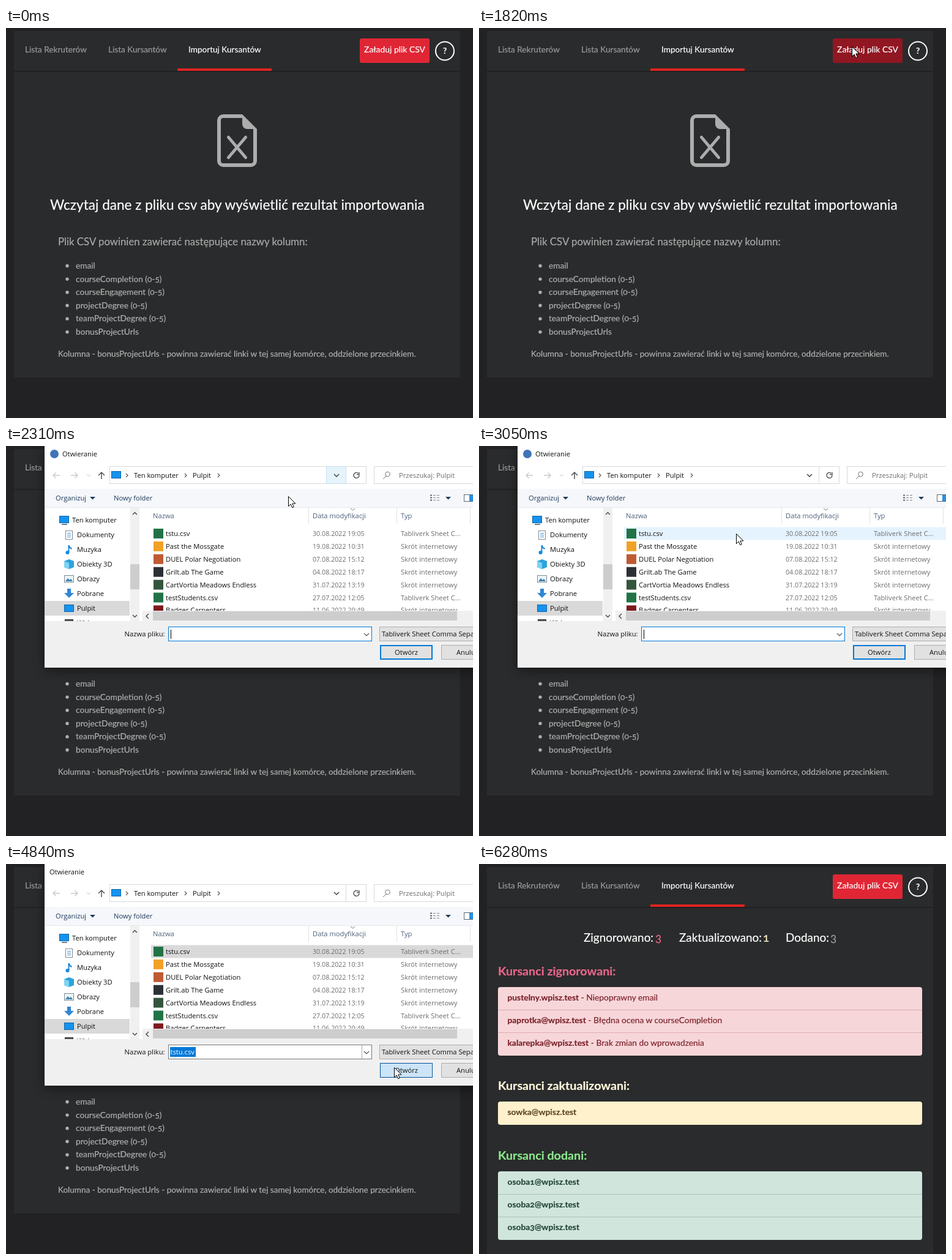
Recreate the animation shown at these times as an HTML page. Size 763 px wide and 637 px high, loop 7.7 s.

```html
<!DOCTYPE html>
<html lang="pl">
<head>
<meta charset="utf-8">
<title>Import kursantów</title>
<style>
html, body { margin: 0; width: 100%; height: 100%; overflow: hidden; background: #222224; }
#stage { display: block; width: 763px; height: 637px; }
text { white-space: pre; }
.web { font-family: Lato, sans-serif; font-variant-numeric: oldstyle-nums; }
.web text { stroke-width: .2px; }
.win { font-family: "Open Sans", "Noto Sans", sans-serif; }
.win text { stroke: none; }
.shadow { filter: drop-shadow(0 4px 9px #0007); }
</style>
</head>
<body>
<svg id="stage" viewBox="0 0 763 637"></svg>
<script>
const LOOP = 7700;
const stage = document.getElementById('stage');

const clamp = v => Math.max(0, Math.min(1, v));
const ramp = (t, a, b) => clamp((t - a) / (b - a));
const mix = (a, b, p) => `rgb(${a.map((v, i) => Math.round(v + (b[i] - v) * p))})`;
const text = (x, y, s, size, fill, more = '') =>
  `<text x="${x}" y="${y}" font-size="${size}" fill="${fill}" stroke="${fill}" ${more}>${s}</text>`;
const rect = (x, y, w, h, fill, more = '') =>
  `<rect x="${x}" y="${y}" width="${w}" height="${h}" fill="${fill}" ${more}/>`;
const line = (d, stroke, width = 1, more = '') =>
  `<path d="${d}" fill="none" stroke="${stroke}" stroke-width="${width}" ${more}/>`;
const shape = (d, fill) => `<path d="${d}" fill="${fill}"/>`;
const box = (x, y, w, h, fill, stroke) =>
  rect(x + .5, y + .5, w - 1, h - 1, fill, `stroke="${stroke}"`);

// Pointer stops: time, x, y
const path = [
  [120, 722, 640], [870, 618, 43], [1150, 607, 33], [1400, 607, 33], [1800, 609, 30],
  [1950, 609, 30], [2310, 461, 82], [2930, 420, 143], [3490, 420, 143], [3840, 529, 215],
  [4240, 634, 332], [5550, 634, 332], [5840, 643, 366], [6280, 695, 640]
];

function pointer(t) {
  const i = path.findIndex(k => k[0] > t);
  if (i < 1) return path[i < 0 ? path.length - 1 : 0].slice(1);
  const [a, b] = [path[i - 1], path[i]];
  const p = ramp(t, a[0], b[0]), e = p * p * (3 - 2 * p);
  return [a[1] + (b[1] - a[1]) * e, a[2] + (b[2] - a[2]) * e];
}

/* ---- web page ---- */

function header(t) {
  const hover = ramp(t, 800, 950) * (1 - ramp(t, 5180, 5400));
  const red = mix([224, 38, 53], [145, 23, 34], hover);
  return rect(13, 70, 729, 2, '#202122') +
    text(31, 40, 'Lista Rekruterów', 13.6, '#9b9b9d') +
    text(167, 40, 'Lista Kursantów', 13.6, '#9b9b9d') +
    text(298, 40, 'Importuj Kursantów', 13.6, '#fff') +
    rect(280, 66, 154, 4, '#dc2420') +
    rect(578, 17, 114, 40, red, 'rx="3"') +
    text(635, 40, 'Załaduj plik CSV', 13.9, '#fff', 'text-anchor="middle"') +
    '<circle cx="717" cy="37.5" r="15" fill="none" stroke="#fff" stroke-width="2"/>' +
    text(717, 42, '?', 13.5, '#fff', 'text-anchor="middle" font-weight="bold"');
}

const columns = ['email', 'courseCompletion (0-5)', 'courseEngagement (0-5)',
  'projectDegree (0-5)', 'teamProjectDegree (0-5)', 'bonusProjectUrls'];

const upload =
  line('M386 144H355a7 7 0 0 0-7 7V217a7 7 0 0 0 7 7H400a7 7 0 0 0 7-7V165', '#adadad', 6) +
  shape('M386 141L410 165H394a8 8 0 0 1-8-8z', '#adadad') +
  line('M363.5 178.5L391.5 211.5M391.5 178.5L363.5 211.5', '#adadad', 5, 'stroke-linecap="round"') +
  text(72, 297, 'Wczytaj dane z pliku csv aby wyświetlić rezultat importowania', 22.55, '#fff') +
  text(85, 355, 'Plik CSV powinien zawierać następujące nazwy kolumn:', 16.8, '#a9a9a9') +
  columns.map((c, i) => `<circle cx="100" cy="${388.5 + i * 21.6}" r="2.7" fill="#b0b0b0"/>` +
    text(114, 393 + i * 21.6, c, 13.7, '#b0b0b0')).join('') +
  text(85, 537, 'Kolumna - bonusProjectUrls - powinna zawierać linki w tej samej komórce, ' +
    'oddzielone przecinkiem.', 13.53, '#b0b0b0');

const spinner = t =>
  `<circle cx="377" cy="87" r="12.8" fill="none" stroke="#dc2f36" stroke-width="3.6"
    pathLength="8" stroke-dasharray="6 2" transform="rotate(${45 + (t - 5090) * .48} 377 87)"/>`;

function section(y, title, titleFill, fill, ink, rows) {
  const h = rows.length * 37 + 1;
  return text(31, y - 19, title, 19.7, titleFill, 'font-weight="bold"') +
    rect(31, y, 693, h, fill, 'rx="4"') +
    rows.map(([mail, note], i) =>
      (i ? rect(31, y + i * 37, 693, 1, ink, 'opacity=".22"') : '') +
      text(46.5, y + 22 + i * 37,
        `<tspan font-weight="bold">${mail}</tspan>${note ? ' - ' + note : ''}`, 13.8, ink)
    ).join('');
}

const results =
  [[171, 'Zignorowano:', 288, 3, '#e9668c'], [327, 'Zaktualizowano:', 464, 1, '#fff3cd'],
    [501, 'Dodano:', 574, 3, '#9b9b9d']].map(([x, label, nx, n, fill]) =>
    text(x, 127, label, 18.9, '#fff') + text(nx, 127, n, 18.9, fill)).join('') +
  section(201, 'Kursanci zignorowani:', '#e9668c', '#f7d6d9', '#7c232c', [
    ['pustelny.wpisz.test', 'Niepoprawny email'],
    ['paprotka@wpisz.test', 'Błędna ocena w courseCompletion'],
    ['kalarepka@wpisz.test', 'Brak zmian do wprowadzenia']]) +
  section(388, 'Kursanci zaktualizowani:', '#fff8dc', '#fff1cc', '#5f4727', [['sowka@wpisz.test']]) +
  section(502, 'Kursanci dodani:', '#8ae98a', '#d0e6dc', '#24463a',
    [1, 2, 3].map(n => [`osoba${n}@wpisz.test`]));

function page(t) {
  const [bottom, content] = t < 5040 ? [571, upload] :
    t < 5560 ? [101, spinner(t)] : [637, results];
  return `<g class="web">${rect(13, 5, 729, bottom - 5, '#2a2b2c')}${header(t)}${content}</g>`;
}

/* ---- file dialog ---- */

const SIZE = 11.2;
const label = (x, y, s, fill = '#111', more) => text(x, y, s, SIZE, fill, more);
const monitor = (x, y) => box(x, y, 16, 12, '#1593ee', '#0b64ad');

const sheet = 'Tabliverk Sheet C...', link = 'Skrót internetowy';
const files = [
  ['tstu.csv', '30.08.2022 19:05', sheet, '#217346'],
  ['Past the Mossgate', '19.08.2022 10:31', link, '#f2a127'],
  ['DUEL Polar Negotiation', '07.08.2022 15:12', link, '#bf5a34'],
  ['Grilt.ab The Game', '04.08.2022 18:17', link, '#2c3036'],
  ['CartVortia Meadows Endless', '31.07.2022 13:19', link, '#34553d'],
  ['testStudents.csv', '27.07.2022 12:05', sheet, '#217346'],
  ['Badger Carpenters', '11.06.2022 20:49', link, '#7d1a1d']
];

const treeIcons = [
  monitor(87, 114) + rect(91, 127, 9, 2, '#69808f'),
  box(97, 138, 12, 15, '#fff', '#7c8a94') +
    line('M100 142.5h6M100 145.5h6M100 148.5h6', '#3b8fd0'),
  line('M102.5 174V162q1 4 5 6', '#1588e0', 2) + '<circle cx="100.5" cy="174" r="3" fill="#1588e0"/>',
  shape('M95 188l8-3 8 3v10l-8 3-8-3z', '#2ea3dc') + shape('M95 188l8 3v10l-8-3z', '#7fd3f2'),
  box(95, 211, 16, 12, '#eef5fa', '#7c8a94') + shape('M97 221l4-5 3 3 2-2 3 4z', '#3a7fae'),
  shape('M100 233h6v7h5l-8 8-8-8h5z', '#2f86d6'),
  monitor(95, 259),
  box(96, 283, 14, 12, '#555', '#333')
];
const treeNames = ['Ten komputer', 'Dokumenty', 'Muzyka', 'Obiekty 3D', 'Obrazy', 'Pobrane',
  'Pulpit', 'Wideo'];
const tree = `<svg width="203" height="286">${rect(63, 253, 139, 24, '#d9d9d9')}${
  treeNames.map((s, i) => treeIcons[i] + label(i ? 116 : 108, 125 + i * 24, s)).join('')}</svg>` +
  rect(203, 101, 15, 185, '#f0f0f0') + rect(203, 193, 15, 41, '#cdcdcd') +
  line('M207 112l3.5-3.5 3.5 3.5M207 276l3.5 3.5 3.5-3.5', '#505050', 1.5);

const frame =
  rect(63, 0, 760, 362, '#fff', 'class="shadow"') +
  line('M88 48H77M81.5 43.5L77 48l4.5 4.5M106 48h11M112.5 43.5l4.5 4.5-4.5 4.5', '#c9c9c9', 1.4) +
  line('M132 46.5l3 3 3-3', '#c4c4c4') +
  line('M156 54V43M151 48l5-5 5 5', '#555', 1.5) +
  box(169, 33, 420, 29, '#fff', '#d9d9d9') + line('M555.5 33v29', '#d9d9d9') +
  monitor(172, 41) + line('M196 45l3 3-3 3M292 45l3 3-3 3M346 45l3 3-3 3', '#555', 1.2) +
  label(209, 52, 'Ten komputer') + label(305, 52, 'Pulpit') +
  line('M575.5 44.5a4.5 4.5 0 1 0 1.5 3M577 43v3.5h-4', '#555', 1.4) +
  box(601, 33, 230, 29, '#fff', '#d9d9d9') +
  '<circle cx="623.5" cy="46" r="3.8" fill="none" stroke="#777"/>' + line('M621 49l-5 5', '#777') +
  label(642, 52, 'Przeszukaj: Pulpit', '#6d6d6d') +
  rect(63, 70, 760, 30, '#f5f7fa') + rect(63, 100, 760, 1, '#e5e8ec') +
  label(81, 89, 'Organizuj', '#1e395b') + shape('M137 83h9l-4.5 4.5z', '#1e395b') +
  label(176, 89, 'Nowy folder', '#1e395b') +
  line('M693 80.5h3M693 84.5h3M693 88.5h3', '#666', 2) +
  line('M698 80.5h4M704 80.5h4M698 84.5h4M704 84.5h4M698 88.5h4M704 88.5h4', '#888') +
  shape('M718 83h9l-4.5 4.5z', '#1e395b') +
  box(748, 79, 16, 12, '#fff', '#5d6b78') + rect(757, 80, 6, 10, '#2b8fe0') +
  tree;

function fileList(t, [cx, cy], focused) {
  const aim = t > 2200 && t < 4290 && cx > 237 && cy < 269 ? Math.floor((cy - 132.5) / 21) : -1;
  const picked = t >= 3490;
  const rows = files.map(([name, date, kind, icon], i) => {
    const y = 143 + i * 20.9;
    const mark = picked && !i
      ? (focused ? rect(237, 132.5, 590, 21, '#d9d9d9') : box(237, 132, 590, 22, '#cce8ff', '#99d1ff'))
      : aim === i ? rect(237, y - 10.5, 590, 21, '#e5f3ff') : '';
    return mark + rect(241, y - 8, 16, 16, icon) + label(261, y + 4, name) +
      text(501, y + 4, date, 10.7, '#6d6d6d') + label(645, y + 4, kind, '#6d6d6d');
  }).join('');
  const head = t > 2200 && t < 2930 && cy > 101 && cy < 127 ? rect(223, 101, 271, 26, '#d9ebf9') : '';
  return head + label(240, 118, 'Nazwa', '#4c607a') + label(501, 118, 'Data modyfikacji', '#4c607a') +
    label(645, 118, 'Typ', '#4c607a') + label(766, 118, 'Rozmiar', '#4c607a') +
    line('M494.5 101v26M638.5 101v26M758.5 101v26', '#e2e2e2') +
    line('M563 102l3.5 3 3.5-3', '#777') +
    `<svg width="830" height="269">${rows}</svg>` +
    rect(223, 269, 600, 17, '#f0f0f0') + rect(240, 270, 497, 15, '#cdcdcd') +
    line('M233 274l-4 4 4 4', '#505050', 1.5);
}

function form(t, focused) {
  const picked = t >= 3490, pressed = t >= 4500;
  const caret = t > 2000 && !picked && Math.floor((t - 2000) / 525) % 2 === 0;
  const face = mix([225, 225, 225], [229, 241, 251], ramp(t, 4200, 4350));
  return rect(63, 286, 760, 76, '#f0f0f0') +
    label(259.5, 311, 'Nazwa pliku:', '#111', 'text-anchor="end"') +
    box(265, 295, 333, 24, '#fff', picked ? '#7a7a7a' : '#0078d7') +
    (focused ? rect(268, 299, 42, 16, '#0078d7') + line('M581.5 296v22', '#adadad') : '') +
    (picked ? label(268.5, 311, 'tstu.csv', focused ? '#fff' : '#111') : '') +
    (caret ? rect(269, 300, 1, 15, '#000') : '') +
    line('M585 306l4 4 4-4', '#555', 1.2) +
    box(610, 295, 210, 24, '#e1e1e1', '#adadad') +
    label(614, 311, 'Tabliverk Sheet Comma Separated') +
    (pressed ? box(611, 325, 86, 24, '#cce4f7', '#005499')
      : rect(612, 326, 84, 22, face, 'stroke="#0078d7" stroke-width="2"')) +
    label(654, 341, 'Otwórz', '#111', 'text-anchor="middle"') +
    box(711, 325, 86, 24, '#e1e1e1', '#adadad') + label(736, 341, 'Anuluj');
}

function dialog(t, at) {
  if (t < 1860 || t >= 5170) return '';
  const closing = Math.min(.86, ramp(t, 5040, 5145));
  const shown = ramp(t, 1860, 2060) * (1 - closing);
  const scale = t < 2060 ? .92 + .08 * shown : 1 - .0467 * closing;
  const focused = t >= 4600;
  const drop = ramp(t, 2060, 2180) * (1 - ramp(t, 2340, 2460));
  const title = focused ? '' : '<circle cx="79" cy="13" r="7" fill="#3f74b8"/>';
  return `<g class="win" opacity="${shown}"
    transform="translate(413 163) scale(${scale}) translate(-413 -163)">` + frame +
    title + label(focused ? 71 : 92, 17, 'Otwieranie') +
    `<g opacity="${drop}">${box(523, 33, 33, 29, '#e5f3fb', '#c4e1f2')}</g>` +
    line('M536 46l4 4 4-4', '#444', 1.5) +
    fileList(t, at, focused) + form(t, focused) + '</g>';
}

/* ---- playback ---- */

function draw() {
  const t = performance.now() % LOOP, at = pointer(t);
  stage.innerHTML = rect(0, 0, 763, 637, '#222224') + page(t) + dialog(t, at) +
    `<path transform="translate(${at})" d="M.5.5V16.5l3.7-3.5 2.5 5.7 2.6-1.1-2.5-5.6H12z"
      fill="#fff" stroke="#000"/>`;
  requestAnimationFrame(draw);
}
draw();
</script>
</body>
</html>
```
